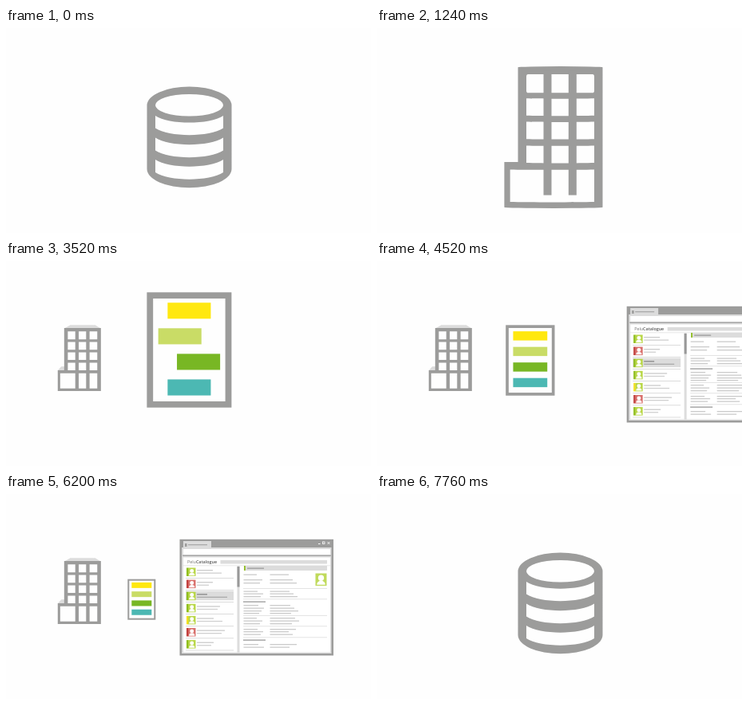
An HTML page with a canvas for the animation above (8.12 s loop, 457 px wide and 257 px high).

```html
<!DOCTYPE html>
<html lang="en">
<head>
<meta charset="utf-8">
<title>Directory loop</title>
<style>
html, body { margin: 0; width: 457px; height: 257px; overflow: hidden; background: #fefefe; }
canvas { display: block; }
</style>
</head>
<body>
<canvas id="stage" width="457" height="257"></canvas>
<script>
const ctx = document.getElementById('stage').getContext('2d');
const LOOP = 8120, GRAY = '#9c9c9b', PALE = '#dcdcdc';
const GREEN = '#8fbe1e', LIME = '#b9d748', RED = '#c2403e', ROSE = '#d9706c';

const mix = (a, b, k) => a + (b - a) * k;
const part = (t, start, length) => Math.min(1, Math.max(0, (t - start) / length));
const cubic = u => u < .5 ? 4 * u ** 3 : 1 - 4 * (1 - u) ** 3;
const sine = u => (1 - Math.cos(Math.PI * u)) / 2;

function box(color, x, y, w, h) {
  ctx.fillStyle = color;
  ctx.fillRect(x, y, w, h);
}

function poly(color, points) {
  ctx.fillStyle = color;
  ctx.beginPath();
  points.forEach(([x, y]) => ctx.lineTo(x, y));
  ctx.fill();
}

// Openings below the lid: top and bottom as cylinder, then as building
const rows = [
  [110, 125.5, 86.6, 108.6],
  [137.5, 153.5, 116, 138],
  [165, 181, 146, 168],
  [187, 187, 176.6, 220.5]
];

// Cylinder that grows into a building, then shrinks to the left
function building(t) {
  const grow = cubic(part(t, 470, 1050));
  const curve = 1 - sine(part(t, 0, 1450));
  const columns = part(t, 500, 800);
  const roof = part(t, 1400, 360);
  const away = cubic(part(t, 2240, 470));
  const scale = mix(1, .434, away);
  const top = mix(73.5, 46, grow), bottom = mix(200.3, 228, grow);
  const left = mix(176.5, 158, grow), bulge = 23.5 * curve;

  ctx.save();
  ctx.translate(mix(158, 64.8, away), mix(46, 84, away));
  ctx.scale(scale, scale);
  ctx.translate(-158, -46);

  if (roof) {
    const y = 46 - 8.5 * roof, ledge = 168 - 11 * roof;
    poly(PALE, [[178, 46.5], [mix(178, 194, roof), y], [mix(281, 266, roof), y], [281, 46.5]]);
    poly(PALE, [[158, 168.5], [mix(158, 168, roof), ledge], [177.5, ledge], [177.5, 168.5]]);
  }

  ctx.fillStyle = GRAY;
  ctx.beginPath();
  ctx.ellipse(229.5, top + bulge, 53, bulge, 0, Math.PI, 2 * Math.PI);
  ctx.lineTo(282.5, bottom - bulge);
  ctx.ellipse((282.5 + left) / 2, bottom - bulge, (282.5 - left) / 2, bulge, 0, 0, Math.PI);
  ctx.lineTo(left, 168);
  ctx.lineTo(176.5, 168);
  ctx.closePath();
  const lid = mix(83, 56, grow);
  ctx.roundRect(187, lid, 85, mix(110.5, 79, grow) - lid, { x: 42.5 * curve, y: 14 * Math.sqrt(curve) });
  rows.forEach(([a, b, c, d], i) => {
    const x = i == 3 ? mix(187, 165, grow) : 187, w = 272 - x, x1 = x + w * .2, x2 = x + w * .8;
    const y0 = mix(a, c, grow), y1 = mix(b, d, grow), sag = 11.5 * curve;
    ctx.moveTo(x, y0);
    ctx.bezierCurveTo(x1, y0 + sag, x2, y0 + sag, 272, y0);
    ctx.lineTo(272, y1);
    ctx.bezierCurveTo(x2, y1 + sag, x1, y1 + sag, x, y1);
    ctx.closePath();
  });
  ctx.fill('evenodd');

  if (columns) {
    const y = top + 5, h = (222 - y) * columns;
    box(GRAY, 208.5, y, 10, h);
    box(GRAY, 239.8, y, 10, h);
  }
  ctx.restore();
}

// Panel whose coloured windows widen into bars
function panel(t, dock) {
  const g = part(t, 2360, 1840);
  const size = (a, b, c) => mix(mix(a, b, g), c, dock);
  const w = size(106, 106, 35), h = size(131.5, 152, 51), line = size(10, 6.5, 2);
  const cx = size(229.5, 229.3, 169.8), cy = size(111.5, 111.5, 132.2);
  ctx.strokeStyle = GRAY;
  ctx.lineWidth = line;
  ctx.strokeRect(cx - (w - line) / 2, cy - (h - line) / 2, w - line, h - line);

  const bw = size(21.7, 73, 25), bh = size(22, 19, 7), gap = size(29.6, 33.5, 11.3);
  ctx.globalAlpha = part(t, 1720, 520);
  ['#ffe80f', '#c9dc66', '#78b724', '#4cb8b3'].forEach((color, i) => {
    const shift = [0, -1, 1, 0][i] * 31.7 * (1 - g);
    const y = cy + size(.8, -2.2, -.9) + (i - 1.5) * gap;
    box(color, cx + shift - bw / 2, y - bh / 2, bw, bh);
  });
  ctx.globalAlpha = 1;
}

function person(color, x, y, w, h) {
  box(color, x, y, w, h);
  ctx.fillStyle = '#fff';
  ctx.beginPath();
  ctx.arc(x + w / 2, y + h * .37, w * .26, 0, 7);
  ctx.fill();
  ctx.beginPath();
  ctx.ellipse(x + w / 2, y + h * .92, w * .38, h * .32, 0, Math.PI, 2 * Math.PI);
  ctx.fill();
}

function browser(x) {
  const line = (a, b, y, color = '#cbcbcb', h = 1.3) => box(color, a, y, b - a, h);
  ctx.save();
  ctx.translate(x - 218, 0);
  box(GRAY, 217.5, 56.8, 192.5, 145.7);
  box(PALE, 222, 59, 35, 9);
  box(GRAY, 224, 62, 2.5, 4);
  line(228, 252, 63, '#aaa');
  box('#fff', 391, 62, 2.5, 1);
  ctx.strokeStyle = '#fff';
  ctx.lineWidth = .8;
  ctx.strokeRect(396.5, 60, 2.5, 2.5);
  ctx.beginPath();
  ctx.moveTo(402.5, 60); ctx.lineTo(405.5, 63);
  ctx.moveTo(405.5, 60); ctx.lineTo(402.5, 63);
  ctx.stroke();
  box(PALE, 220, 67, 187.5, 133);
  box('#fff', 222, 69, 184, 7);
  line(221, 407, 76.5, '#aaa', 1.5);
  box('#fff', 222, 79.5, 184, 119);

  ctx.font = '400 5.4px "Open Sans", sans-serif';
  ctx.fillStyle = '#777';
  ctx.fillText('Pelu', 227, 87);
  const w = ctx.measureText('Pelu').width;
  ctx.font = '600 5.4px "Open Sans", sans-serif';
  ctx.fillStyle = '#555';
  ctx.fillText('Catalogue', 227 + w, 87);
  box(PALE, 268.5, 83, 133.5, 4.5);
  line(222, 406, 89.5, '#ddd', .7);

  // Contact list
  const tags = [GREEN, RED, GREEN, GREEN, '#f4e020', RED, GREEN];
  const ends = [[259, 270], [259, 254], [252, 277], [268, 265], [260, 271], [274, 270], [260, 257]];
  tags.forEach((tag, i) => {
    const y = 92.5 + i * 15.1;
    if (i == 2) box(PALE, 225, y - 1, 60, 11.5);
    person(tag == RED ? ROSE : LIME, 228, y, 9.5, 10.5);
    box(tag, 226, y, 2.3, 10.5);
    line(239, ends[i][0], y + 2.5, i == 2 ? '#888' : '#cbcbcb');
    line(239, ends[i][1], y + 6, i == 2 ? '#aaa' : '#d0d0d0');
    line(225, 285, y + 12.5, '#ccc', .7);
  });
  box('#ddd', 289.5, 90, 3, 109);
  box('#999', 289.5, 91, 3, 25.5);

  // Details
  box(PALE, 298, 90, 104, 6);
  box(GREEN, 298, 90, 1.8, 6);
  line(302, 323, 92.5, GRAY);
  person('#c0da5c', 387.5, 99.5, 14, 15.5);
  [100.5, 107, 111, 121.5, 124.5, 128, 139, 142.5, 146, 149, 155, 158.5, 162, 169, 172, 175.5, 188, 191.5]
    .forEach((y, i) => {
      line(297.5, 314 + i * 7 % 10, y);
      line(330.5, 354 + i * 5 % 14, y);
    });
  [118, 131.5, 152, 165.5, 179.5].forEach(y => line(297, 402, y, '#d8d8d8', .7));
  line(297, 325, 134.5, '#999');
  line(297, 325, 182.5, '#999');
  ctx.restore();
}

const start = performance.now();

function draw(now) {
  const t = Math.max(0, now - start) % LOOP;
  const dock = 1 - (1 - part(t, 4200, 820)) ** 2;
  const x = mix(475, 218, dock) - 412 * part(t, 6160, 1600) ** 2.6;

  box('#fefefe', 0, 0, 457, 257);
  // The sweeping window hides the old scene and uncovers the cylinder
  if (t > 1720 && x > 151) panel(t, dock);
  if (x > 63) building(t);
  if (x < 151) building(0);
  if (t > 4200 && x > -193) browser(x);
  requestAnimationFrame(draw);
}
requestAnimationFrame(draw);
</script>
</body>
</html>
```
